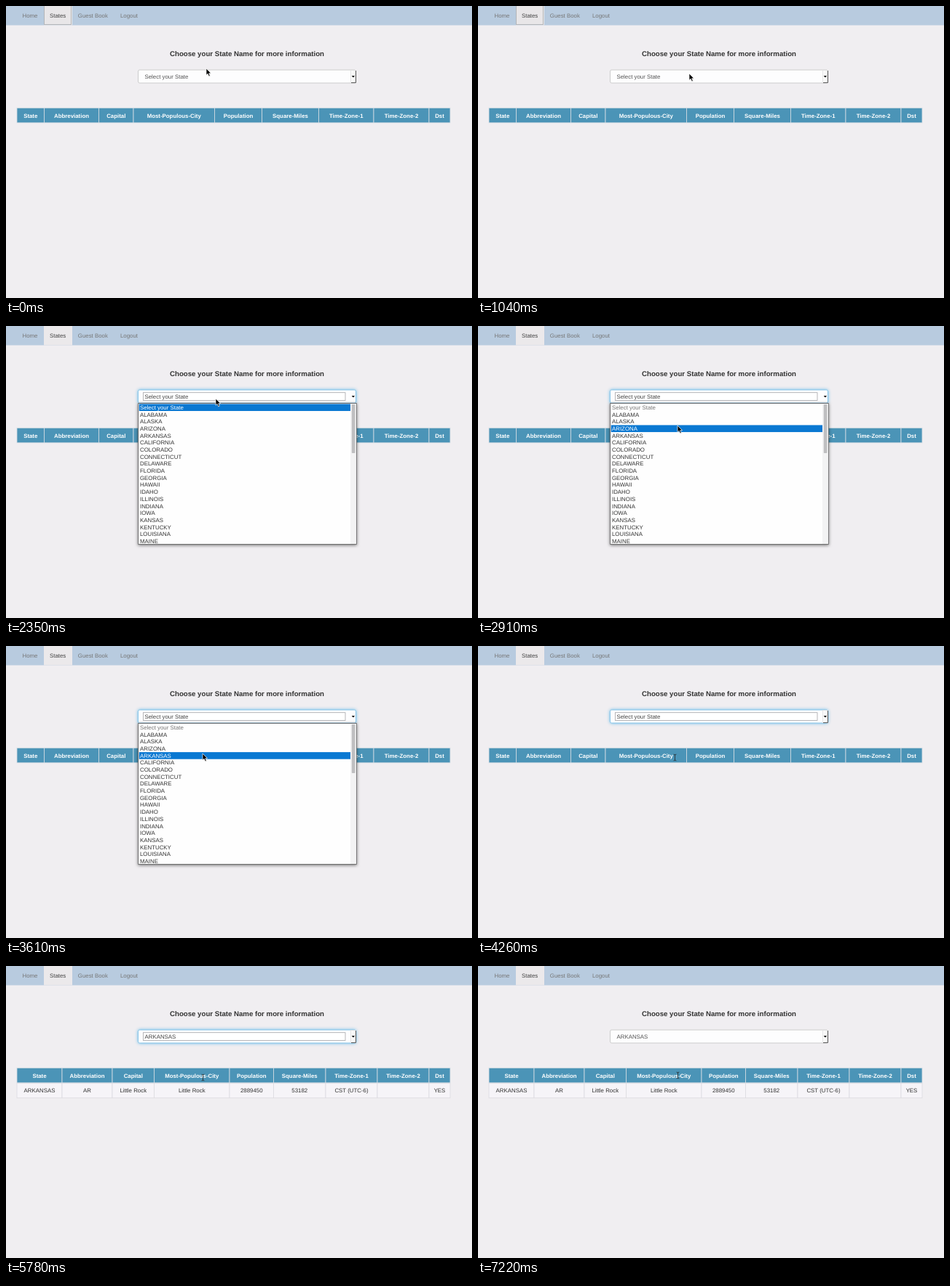
An HTML page that plays this animation: 640x402 px, repeating every 7270 ms.

```html
<!DOCTYPE html>
<html lang="en">
<head>
<meta charset="utf-8">
<title>State lookup</title>
<style>
html, body { margin: 0; width: 100%; height: 100%; overflow: hidden; background: #f0eef1; }
svg { display: block; }
text { font: 7.875px "Liberation Sans", Arial, sans-serif; fill: #333; text-rendering: geometricPrecision; white-space: pre; }
.nav { fill: #777; }
.title { font-size: 9.66px; font-weight: bold; }
.head { font-weight: bold; fill: #fff; }
.mid { text-anchor: middle; }
.glow { filter: drop-shadow(0 0 2px #66bbe9); }
.drop { filter: drop-shadow(0 1.5px 2px #0008); }
</style>
</head>
<body>
<svg id="stage" width="640" height="402" viewBox="0 0 640 402"></svg>
<script>
const LOOP = 7270, OPEN = 1260, CLOSE = 4020, LOADED = 4340, BLUR = 6900;
const ROW = 9.68, LIST_TOP = 107.4;
const PROMPT = "Select your State";
const options = [PROMPT, ..."ALABAMA ALASKA ARIZONA ARKANSAS CALIFORNIA COLORADO CONNECTICUT DELAWARE FLORIDA GEORGIA HAWAII IDAHO ILLINOIS INDIANA IOWA KANSAS KENTUCKY LOUISIANA MAINE".split(" ")];
const heads = "State Abbreviation Capital Most-Populous-City Population Square-Miles Time-Zone-1 Time-Zone-2 Dst".split(" ");
const record = ["ARKANSAS", "AR", "Little Rock", "Little Rock", "2889450", "53182", "CST (UTC-6)", "", "YES"];
const emptyEdges = [15, 52.5, 127.5, 175, 286.5, 351.5, 429.5, 505, 581, 610];
const filledEdges = [15, 77, 146, 203.5, 307, 367.5, 439, 510, 581, 610];
// Pointer path: time, x, y
const path = [[0, 275, 86], [100, 275, 86], [740, 290, 93], [1300, 290, 93], [1700, 288, 100],
  [2400, 288, 100], [2850, 274, 137], [3000, 274, 137], [3400, 270, 148], [6300, 270, 148],
  [7000, 274, 145], [LOOP, 274, 145]];

const rect = (x, y, w, h, fill, more = "") =>
  `<rect x="${x}" y="${y}" width="${w}" height="${h}" fill="${fill}" ${more}/>`;
const text = (x, y, s, cls = "", more = "") => `<text x="${x}" y="${y}" class="${cls}" ${more}>${s}</text>`;
const group = (id, body) => `<g id="${id}">${body}</g>`;

function cells(edges, labels, y, fill, border, cls) {
  return labels.map((s, i) => {
    const x = edges[i], w = edges[i + 1] - x;
    return rect(x, y, w, 20.5, fill, `stroke="${border}" stroke-width=".8"`) +
      text(x + w / 2, y + 13.2, s, "mid " + cls);
  }).join("");
}
const header = edges => cells(edges, heads, 140.3, "#4b94b7", "#d5dde3", "head");

const bevel = rect(473, 88.5, 7.5, 17.5, "#fafafa") +
  '<path d="M473.5 105.5V88.5H480" fill="none" stroke="#ddd" stroke-width=".7"/>' +
  '<path d="M474 105.6H480.5V89" fill="none" stroke="#555"/>';

stage.innerHTML =
  rect(0, 0, 640, 402, "#f0eef1") +
  rect(0, 0, 640, 26.5, "#b8cbdf") +
  rect(52, 0, 39, 26.5, "#ebe9eb") +
  group("tabFocus", rect(52.5, -1, 37, 26.5, "#e8e6e8", 'stroke="#aeb0b4" stroke-width=".9"')) +
  text(22.5, 16.2, "Home", "nav") + text(60, 16.2, "States", "", 'style="fill:#444"') +
  text(98.8, 16.2, "Guest Book", "nav") + text(157, 16.2, "Logout", "nav") +
  text(331, 69.3, "Choose your State Name for more information", "title mid") +
  group("emptyTable", header(emptyEdges)) +
  group("filledTable", cells(filledEdges, record, 161.2, "#f6f4f8", "#dddbe0", "") + header(filledEdges)) +
  group("plainBox", rect(181.5, 88, 299, 18, "#fdfdfe", 'rx="2" stroke="#ccc"')) +
  group("focusBox", rect(181.5, 88, 299, 18, "#fdfdfe", 'rx="2" stroke="#8cc6e8" class="glow"') +
    rect(188.5, 91.7, 277.5, 10.8, "#fff", 'stroke="#a5a5a8" stroke-width=".8"')) +
  group("button", bevel) +
  '<path d="M474.8 96h4.2l-2.1 2.6z"/>' +
  text(190.5, 100, PROMPT, "", 'id="value"') +
  group("list", rect(181.7, 106.5, 299.6, 194, "#fefefe", 'stroke="#666" stroke-width=".9" class="drop"') +
    rect(473, 107.2, 7.7, 192.8, "#f3f3f4") + rect(474.8, 108, 4.6, 67, "#bfbfc1", 'rx=".8"') +
    rect(182.8, LIST_TOP, 290.2, 9.6, "#0a78d2", 'id="mark"') +
    options.map((s, i) => text(184, (115 + ROW * i).toFixed(2), s, "option")).join("")) +
  group("arrow", '<path d="M0 0V9.2L2.1 7.3L3.7 10.9L5.3 10.2L3.8 6.7H6.6Z" fill="#000" stroke="#fff" stroke-width=".7"/>') +
  group("beam", '<path d="M-1.3 1.2Q.5 1.2.5 2.2Q.5 1.2 2.3 1.2M.5 2V9M-1.3 9.8Q.5 9.8.5 8.8Q.5 9.8 2.3 9.8" fill="none" stroke="#222" stroke-width=".8"/>');

const $ = id => document.getElementById(id);
const show = (id, on) => $(id).style.display = on ? "" : "none";
const labels = document.querySelectorAll(".option");

function pointer(t) {
  const i = path.findIndex(p => p[0] > t);
  const [t0, x0, y0] = path[i - 1], [t1, x1, y1] = path[i];
  const u = (t - t0) / (t1 - t0), k = u * u * (3 - 2 * u);
  return [x0 + (x1 - x0) * k, y0 + (y1 - y0) * k];
}

function draw(now) {
  const t = now % LOOP, [x, y] = pointer(t);
  const open = t >= OPEN && t < CLOSE, focus = t >= OPEN && t < BLUR, loaded = t >= LOADED;
  show("tabFocus", t < OPEN);
  show("emptyTable", !loaded);
  show("filledTable", loaded);
  show("plainBox", !focus);
  show("focusBox", focus);
  show("button", !open);
  show("list", open);
  show("arrow", t < CLOSE);
  show("beam", t >= CLOSE);
  $("value").textContent = loaded ? "ARKANSAS" : PROMPT;
  $("value").style.fill = focus ? "#444" : "#555";

  const pick = Math.max(0, Math.floor((y - LIST_TOP) / ROW));
  $("mark").setAttribute("y", LIST_TOP + ROW * pick);
  labels.forEach((el, i) => el.style.fill = i === pick ? "#fff" : i ? "#333" : "#777");
  $(t < CLOSE ? "arrow" : "beam").setAttribute("transform", `translate(${x} ${y})`);
  requestAnimationFrame(draw);
}
requestAnimationFrame(draw);
</script>
</body>
</html>
```
